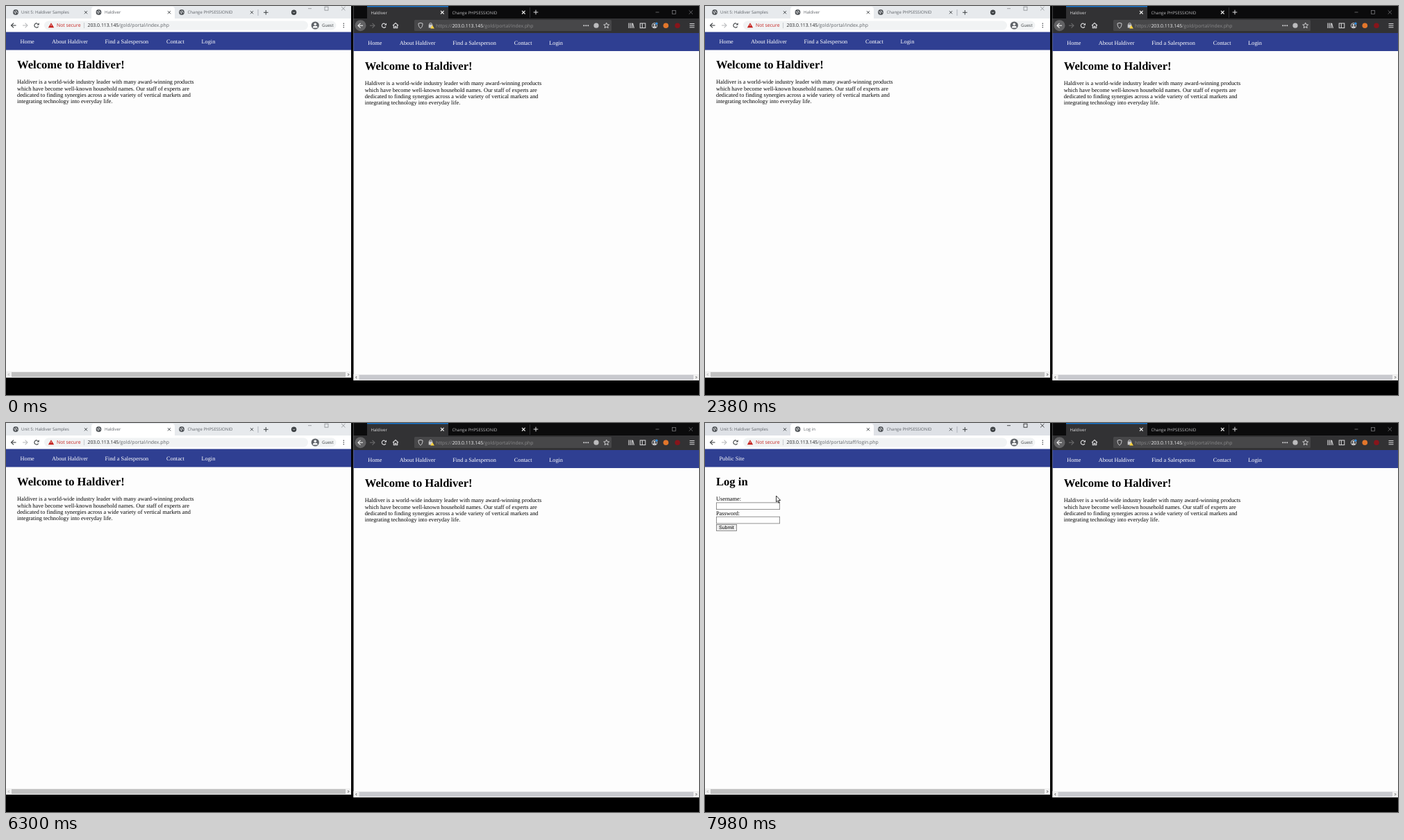
Recreate the animation shown at these times as an HTML page with a canvas. Size 998 px wide and 561 px high, loop 8 s.

```html
<!DOCTYPE html>
<html lang="en">
<head>
<meta charset="utf-8">
<title>Two browsers</title>
<style>
html, body { margin: 0; width: 100%; height: 100%; overflow: hidden; background: #000; }
canvas { display: block; }
</style>
</head>
<body>
<canvas id="stage" width="998" height="561"></canvas>
<script>
const ctx = document.getElementById('stage').getContext('2d');
const LOOP = 8000, FOCUS = 6600, LOADED = 6840, MOVE_START = 6880, MOVE_END = 7440;
const SERIF = '"Liberation Serif", serif', UI = '"Open Sans", sans-serif', ARIAL = '"Liberation Sans", sans-serif';
const NAV = '#2f3f92', PAGE = '#fdfdfd';
const HOST = '203.0.113.145', HOME = '/gold/portal/index.php', LOGIN = '/gold/portal/staff/login.php';
const INTRO = [
  'Haldiver is a world-wide industry leader with many award-winning products',
  'which have become well-known household names. Our staff of experts are',
  'dedicated to finding synergies across a wide variety of vertical markets and',
  'integrating technology into everyday life.'
];
const MENU = [['Home', 20.5], ['About Haldiver', 66], ['Find a Salesperson', 142.5], ['Contact', 231], ['Login', 281.5]];
const HAND = new Path2D('M3 0.7C3 -.3 4.5 -.3 4.5 .7V4.2C5 3.6 6 3.8 6.1 4.5C6.7 4 7.5 4.3 7.6 5C8.3 4.6 9 5 9 5.8V8.4C9 9.7 8 10.2 8 11.6H3.6C3.5 10 1.7 8.8 .6 6.8C0 5.8 1.3 5.2 2 6L3 7Z');
const ARROW = new Path2D('M0 0V8.8L2 7L3.3 10.2L4.7 9.6L3.4 6.5H6.1Z');
const SHIELD = new Path2D('M-3 -3L0 -3.8L3 -3C3 .5 2.2 2.5 0 4C-2.2 2.5 -3 .5 -3 -3Z');
const HOUSE = new Path2D('M-4 0L0 -3.7L4 0M-2.7 -.8V3.5H-.8V1H.8V3.5H2.7V-.8');

function rect(x, y, w, h, color) {
  ctx.fillStyle = color;
  ctx.fillRect(x, y, w, h);
}
function round(x, y, w, h, r, color) {
  ctx.fillStyle = color;
  ctx.beginPath();
  ctx.roundRect(x, y, w, h, r);
  ctx.fill();
}
function disc(x, y, r, color) {
  ctx.fillStyle = color;
  ctx.beginPath();
  ctx.arc(x, y, r, 0, Math.PI * 2);
  ctx.fill();
}
function line(points, color, width = 1) {
  ctx.strokeStyle = color;
  ctx.lineWidth = width;
  ctx.beginPath();
  for (let i = 0; i < points.length; i += 2) ctx.lineTo(points[i], points[i + 1]);
  ctx.stroke();
}
function box(x, y, w, h, color, width = 1) {
  ctx.strokeStyle = color;
  ctx.lineWidth = width;
  ctx.strokeRect(x, y, w, h);
}
function ring(x, y, r, color, width = 1, from = 0, to = Math.PI * 2) {
  ctx.strokeStyle = color;
  ctx.lineWidth = width;
  ctx.beginPath();
  ctx.arc(x, y, r, from, to);
  ctx.stroke();
}
function text(str, x, y, size, color, family = UI, weight = '') {
  ctx.font = `${weight} ${size}px ${family}`;
  ctx.fillStyle = color;
  ctx.fillText(str, x, y);
  return x + ctx.measureText(str).width;
}
function at(x, y, draw) {
  ctx.save();
  ctx.translate(x, y);
  draw();
  ctx.restore();
}
function shape(path, x, y, stroke, width, fill) {
  at(x, y, () => {
    if (fill) { ctx.fillStyle = fill; ctx.fill(path); }
    ctx.strokeStyle = stroke;
    ctx.lineWidth = width;
    ctx.stroke(path);
  });
}
function cross(x, y, r, color, width = 1) {
  line([x - r, y - r, x + r, y + r], color, width);
  line([x + r, y - r, x - r, y + r], color, width);
}
function plus(x, y, color) {
  line([x - 3.3, y, x + 3.3, y], color);
  line([x, y - 3.3, x, y + 3.3], color);
}
function arrow(x, y, dir, color) {
  line([x - 3.5 * dir, y, x + 3.5 * dir, y], color, 1.1);
  line([x, y - 3.4, x + 3.5 * dir, y, x, y + 3.4], color, 1.1);
}
function triangle(x, y, r, color) {
  ctx.fillStyle = color;
  ctx.beginPath();
  ctx.moveTo(x, y - r);
  ctx.lineTo(x + r * 1.1, y + r * 0.85);
  ctx.lineTo(x - r * 1.1, y + r * 0.85);
  ctx.fill();
}
function reload(x, y, color) {
  ring(x, y, 3, color, 1.1, 0.5, 5.3);
  ctx.fillStyle = color;
  ctx.beginPath();
  ctx.moveTo(x + 3.7, y - 3.8);
  ctx.lineTo(x + 3.7, y - 0.4);
  ctx.lineTo(x + 0.4, y - 0.4);
  ctx.fill();
}
function globe(x, y) {
  disc(x, y, 3.9, '#54585c');
  line([x - 2.7, y - 0.8, x - 0.3, y + 0.2, x - 0.8, y + 2.5], '#eceef0', 1);
  line([x + 0.2, y - 2.6, x + 0.8, y - 0.8, x + 2.6, y + 0.4], '#eceef0', 1);
}
function windowButtons(x, y, color) {
  line([x - 2.5, y, x + 2.5, y], color, 0.8);
  box(x + 21.5, y - 2.5, 5, 5, color, 0.8);
  cross(x + 48.3, y, 2.7, color, 0.8);
}
function star(x, y, color) {
  const points = [];
  for (let i = 0; i <= 10; i++) {
    const a = i * Math.PI / 5 - Math.PI / 2, r = i % 2 ? 1.9 : 4.2;
    points.push(x + r * Math.cos(a), y + r * Math.sin(a));
  }
  line(points, color, 0.9);
}
function scrollbar(x, y, w, track, thumb, left, right) {
  rect(x, y, w, 9, track);
  rect(x + 8, y + 1, w - 16, 7, thumb);
  line([x + 4.7, y + 3, x + 3.2, y + 4.5, x + 4.7, y + 6], left, 1);
  line([x + w - 4.7, y + 3, x + w - 3.2, y + 4.5, x + w - 4.7, y + 6], right, 1);
}

// Page bodies use the left window's coordinates.
function homePage() {
  for (const [label, x] of MENU) text(label, x, 53.6, 8.31, '#fff', SERIF);
  text('Welcome to Haldiver!', 16, 89.8, 16.6, '#000', SERIF, 'bold');
  INTRO.forEach((s, i) => text(s, 16, 112.4 + i * 9.35, 8.31, '#000', SERIF));
}
function loginPage() {
  text('Public Site', 20.5, 53.6, 8.31, '#fff', SERIF);
  text('Log in', 16, 89.8, 16.6, '#000', SERIF, 'bold');
  text('Username:', 16, 112.4, 8.31, '#000', SERIF);
  text('Password:', 16, 132.6, 8.31, '#000', SERIF);
  for (const y of [114.5, 134.8]) {
    rect(16, y, 92, 10.5, '#fff');
    box(16.4, y + 0.4, 91.2, 9.7, '#767676', 0.8);
  }
  round(16, 146, 30, 10, 1, '#efefef');
  box(16.4, 146.4, 29.2, 9.2, '#767676', 0.8);
  text('Submit', 20, 153.4, 7, '#000', ARIAL);
}

function lightBrowser(focused, loading, loaded) {
  const grey = '#5f6368', dark = '#3c4043';
  rect(0, 0, 497, 536, PAGE);
  rect(0, 0, 497, 18, focused ? '#dee1e6' : '#e7eaed');
  rect(0, 18, 497, 19, '#fff');
  round(123, 1, 120, 18, [4, 4, 0, 0], '#fff');
  globe(14, 9);
  if (!loading) globe(133.5, 9);
  globe(253, 9);
  text('Unit 5: Haldiver Samples', 22, 11.4, 6.05, grey);
  text(loaded ? 'Log in' : 'Haldiver', 142, 11.4, 6.05, grey);
  text('Change PHPSESSIONID', 261.5, 11.4, 6.05, grey);
  for (const x of [115, 235, 354]) cross(x, 9.2, 2.1, dark, 0.9);
  line([363, 5, 363, 14], '#9aa0a6', 0.7);
  plus(374.3, 9.3, dark);
  disc(414.6, 9.2, 3.7, dark);
  line([413, 8.5, 414.6, 10.1, 416.2, 8.5], '#e7eaed', 0.9);
  windowButtons(437.5, 3.7, focused ? '#222' : '#8d9093');

  arrow(11, 28, -1, dark);
  arrow(27.5, 28, 1, '#babcbe');
  if (loading) cross(44, 28, 2.9, dark, 1.1);
  else reload(44, 28, dark);
  round(55, 21.5, 380, 13, 6.5, '#f1f3f4');
  triangle(65, 28, 3.8, '#c5221f');
  line([65, 26.6, 65, 28.8], '#fff', 0.8);
  text('Not secure', 73, 30.3, 6.85, '#c5221f');
  line([112.5, 24, 112.5, 32], '#bdc1c6', 0.8);
  const end = text(HOST, 117.5, 30.3, 6.88, '#202124');
  text(loaded ? LOGIN : HOME, end, 30.3, 6.88, grey);
  round(438.5, 21.5, 37, 13, 6.5, '#f1f3f4');
  disc(445.3, 28, 5.6, grey);
  disc(445.3, 26.3, 1.8, '#fff');
  round(442, 28.8, 6.6, 2.8, [2, 2, 0, 0], '#fff');
  text('Guest', 455, 30.2, 6.1, dark);
  for (let i = -1; i <= 1; i++) disc(486.3, 28 + i * 2.7, 0.8, dark);

  rect(0, 37.5, 497, 26, NAV);
  if (loaded) loginPage();
  else homePage();
  scrollbar(0, 527, 497, '#f1f1f1', '#c1c1c1', '#a3a3a3', '#404040');
}

function darkBrowser() {
  const light = '#dcdcde', dim = '#8b8b8d';
  rect(500.5, 0, 497.5, 540, PAGE);
  rect(500.5, 0, 497.5, 18, '#0b0b0c');
  rect(500.5, 18, 497.5, 21, '#323234');
  rect(520, 0, 117, 18, '#323234');
  rect(520, 0, 117, 1.4, '#1477d4');
  line([754.5, 2, 754.5, 17], '#39393b', 0.8);
  text('Haldiver', 525.5, 11.9, 6.05, light);
  text('Change PHPSESSIONID', 642.5, 11.9, 6.05, '#b9b9bb');
  cross(628.3, 9.2, 2.3, '#f4f4f4', 1.1);
  cross(745.3, 9.2, 2.3, '#f4f4f4', 1.1);
  plus(763, 9, light);
  windowButtons(938, 9, '#77777a');

  disc(510.5, 28.2, 8, '#626264');
  arrow(510.5, 28.2, -1, '#f2f2f2');
  arrow(527.5, 28.2, 1, '#6a6a6c');
  reload(544.3, 28.2, light);
  shape(HOUSE, 561, 28.2, light, 1.1);
  round(588, 20, 284, 16, 1.5, '#474749');
  shape(SHIELD, 597, 28.2, light, 0.9);
  ring(611.5, 26.3, 1.8, '#c9c9cb', 1, Math.PI, 0);
  rect(608.7, 26.5, 5.6, 5, '#c9c9cb');
  triangle(614, 30.3, 2.6, '#ffd43b');
  let end = text('https://', 619, 31, 6.87, dim);
  end = text(HOST, end, 31, 6.87, '#f4f4f5');
  text(HOME, end, 31, 6.87, dim);
  for (let i = -1; i <= 1; i++) disc(835.3 + i * 3, 28.2, 1, light);
  disc(850, 28.2, 3.6, '#bcbcbe');
  star(864.7, 28.3, light);

  for (const x of [897, 899.3, 901.6]) line([x, 24.5, x, 32], light, 1.1);
  line([902.6, 25, 904.3, 32], light, 1.1);
  box(913.2, 25, 7.6, 6.6, light, 1);
  line([916.3, 25, 916.3, 31.6], light, 1);
  ring(934, 28.3, 3.7, light, 0.9);
  disc(934, 27.3, 1.4, light);
  round(931.8, 29.3, 4.4, 1.8, 0.9, light);
  disc(937, 25.2, 1.6, '#2a8ee8');
  disc(950.3, 28.2, 3.8, '#e2762b');
  disc(967, 28.2, 3.8, '#87151b');
  for (let i = -1; i <= 1; i++) line([984.5, 28.2 + i * 2.6, 991.5, 28.2 + i * 2.6], light, 1);

  rect(500.5, 39, 497.5, 26, NAV);
  at(500.7, 2, homePage);
  scrollbar(500.5, 531, 497.5, '#f0f0f0', '#c9cacf', '#505050', '#505050');
}

function pointer(t) {
  if (t < LOADED) return shape(HAND, 288.7, 53, '#000', 0.8, '#fff');
  const p = Math.min(1, Math.max(0, (t - MOVE_START) / (MOVE_END - MOVE_START)));
  const e = p * p * (3 - 2 * p);
  shape(ARROW, 292 - 189.4 * e, 53 + 52 * e, '#000', 0.8, '#fff');
}

function draw(t) {
  rect(0, 0, 998, 561, '#000');
  lightBrowser(t >= FOCUS, t >= FOCUS && t < LOADED, t >= LOADED);
  darkBrowser();
  if (t >= FOCUS) pointer(t);
}

ctx.textRendering = 'geometricPrecision';
const start = performance.now();
function tick() {
  draw((performance.now() - start) % LOOP);
  requestAnimationFrame(tick);
}
tick();
</script>
</body>
</html>
```
